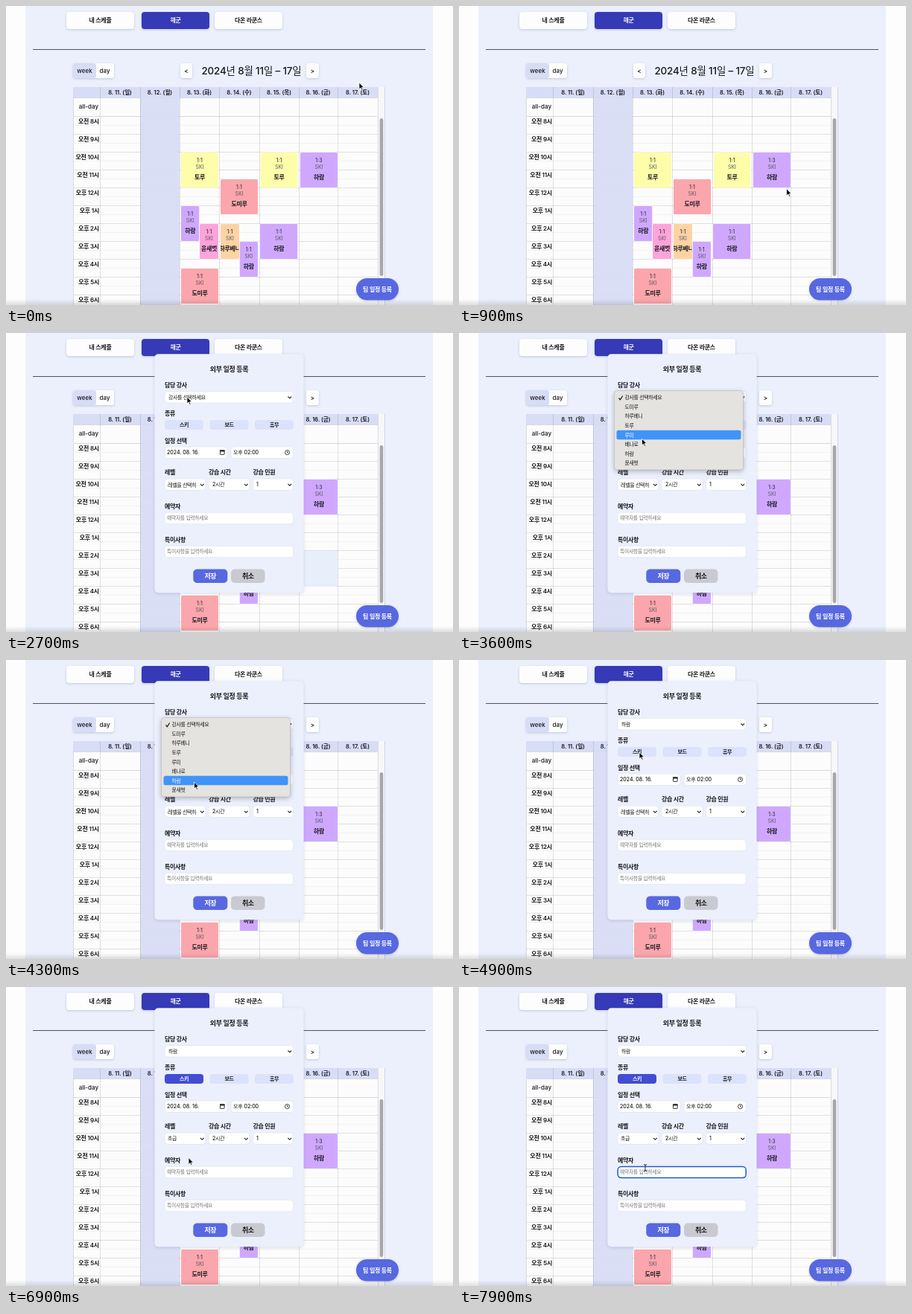
Animation, 600 px wide and 402 px high, one loop 8 s. Source, as an HTML page:

```html
<!DOCTYPE html>
<html lang="ko">
<head>
<meta charset="utf-8">
<title>팀 일정</title>
<style>
html, body { margin: 0; width: 100%; height: 100%; overflow: hidden; background: #fdfdfd; }
svg { display: block; }
text { font-family: Inter, 'Noto Sans CJK KR', 'Noto Sans CJK', sans-serif; font-weight: 500; white-space: pre; }
.m { text-anchor: middle; }
.e { text-anchor: end; }
.b { font-weight: 600; }
.n { font-weight: 400; }
.shadow { filter: drop-shadow(0 1px 1.5px rgba(40, 50, 90, .22)); }
.soft { filter: drop-shadow(0 1px 2px rgba(40, 50, 90, .16)); }
.deep { filter: drop-shadow(0 2px 3px rgba(40, 40, 60, .3)); }
</style>
</head>
<body>
<svg id="stage" width="600" height="402"></svg>
<script>
const INK = '#17171c', PALE = '#d8ddf6', PAGE = '#ebf0fc', BLUE = '#5768e0', WHITE = '#fdfdfe';
const YELLOW = '#fdfdaa', RED = '#fba6ac', PURPLE = '#cfa8fe', PINK = '#fda4da', ORANGE = '#fed3a4';
const SHORT = '하람', DUO = '토루', TRIO = '도미루', QUAD = '하루베니', FULL = '윤새벗';

const rect = (x, y, w, h, fill, r = 0, more = '') =>
  `<rect x="${x}" y="${y}" width="${w}" height="${h}" rx="${r}" fill="${fill}" ${more}/>`;

// y is the middle of the line; Hangul is set a little tighter than Latin
const text = (x, y, s, size = 8, cls = '', fill = INK) => {
  const tight = -.05 * (s.match(/[가-힣]/g) || []).length / s.length;
  return `<text x="${x}" y="${y + size * .36}" font-size="${size}" class="${cls}" fill="${fill}" letter-spacing="${(tight * size).toFixed(3)}">${s}</text>`;
};
const path = (d, stroke, w = 1, more = '') =>
  `<path d="${d}" fill="none" stroke="${stroke}" stroke-width="${w}" ${more}/>`;
const button = (x, y, w, h, s, fill, ink, size = 8, r = 4, cls = 'shadow') =>
  rect(x, y, w, h, fill, r, `class="${cls}"`) + text(x + w / 2, y + h / 2, s, size, 'm b', ink);
const box = (x, y, w, h, inner) => `<svg x="${x}" y="${y}" width="${w}" height="${h}">${inner}</svg>`;
const group = (id, inner, more = '') => `<g id="${id}" ${more}>${inner}</g>`;

function event(x, y, w, name, fill, ratio = '1:1') {
  return rect(x - .5, y - .5, w + 1, 48, '#fff', 2) + box(x, y, w, 47,
    rect(0, 0, w, 47, fill, 1.5) +
    text(w / 2, 11, ratio, 6.9, 'm', '#3c3942') +
    text(w / 2, 20, 'SKI', 6.9, 'm n', '#5d5965') +
    text(w / 2, 33, name, 8, 'm b'));
}

function calendar() {
  const cols = [126, 180, 233, 286, 340, 393, 445, 499];
  let out = rect(90, 109, 418, 293, '#fcfcfd');
  for (let y = 149; y < 402; y += 12)
    out += path(`M90 ${y - .5}H499`, (y - 149) % 24 ? 'rgba(0,0,0,.04)' : 'rgba(0,0,0,.11)');
  out += path('M90 123.5H508M90 148.5H508', '#d9d9de') + path('M90.5 402V109.5H508', '#d9d9e0');
  out += rect(180, 109, 53, 293, PALE, 0, 'opacity=".93"') + rect(90, 109, 409, 14, PALE) +
    rect(499, 109, 9, 293, '#f7f7f9');
  out += path([...cols, 508].map(x => `M${x + .5} 109V402`).join(''), 'rgba(0,0,0,.11)');
  [...'일월화수목금토'].forEach((day, i) =>
    out += text((cols[i] + cols[i + 1]) / 2, 115.8, `8. ${11 + i}. (${day})`, 7.6, 'm b'));
  out += text(124, 135, 'all-day', 8, 'e');
  for (let h = 8; h < 19; h++)
    out += text(125, 155.3 + (h - 8) * 24, `${h < 12 ? '오전' : '오후'} ${h > 12 ? h - 12 : h}시`, 8, 'e b');
  out += group('cell', rect(394, 293, 51, 48, '#e8effb'));
  out += event(235, 197, 50, DUO, YELLOW) + event(288, 233, 50, TRIO, RED) +
    event(341.5, 197, 50, DUO, YELLOW) + event(395, 197, 50, SHORT, PURPLE, '1:3') +
    event(235, 269, 24.5, SHORT, PURPLE) + event(260, 293, 25, FULL, PINK) +
    event(288, 293, 25, QUAD, ORANGE) + event(313.5, 317, 24.5, SHORT, PURPLE) +
    event(341, 293, 50.5, SHORT, PURPLE) + event(235, 353, 50, TRIO, RED);
  return out + rect(501.7, 151, 4.6, 212, '#a8a8ac', 2.3);
}

const field = (x, y, w) => rect(x, y, w, 15.5, '#fff', 4, 'stroke="#dfe3ee" stroke-width=".7"');
const select = (x, y, w, inner) => field(x, y, w) + inner +
  path(`M${x + w - 7} ${y + 7}l2.3 2.3l2.3-2.3`, '#222', 1.1);

function modal() {
  let out = rect(199.4, 28.3, 200.2, 321, '#ecf0fc', 5, 'class="soft"') + text(299.5, 48.3, '외부 일정 등록', 9, 'm b');
  [[213, 70.3, '담당 강사'], [213, 108, '종류'], [213, 145, '일정 선택'], [213, 187.5, '레벨'],
   [272, 187.5, '강습 시간'], [331.5, 187.5, '강습 인원'], [213, 233, '예약자'], [213, 278, '특이사항']]
    .forEach(([x, y, s]) => out += text(x, y, s, 8, 'b'));
  out += select(213, 78.5, 172.5, group('noTeacher', text(218, 86.3, '강사를 선택하세요', 6.9)) +
    group('teacher', text(218, 86.3, SHORT, 6.9)));
  ['스키', '보드', '휴무'].forEach((s, i) =>
    out += button(213 + i * 60.5, 117, 52, 13, s, '#dbe2fb', INK, 7, 4, ''));
  out += group('ski', button(213, 117, 52, 13, '스키', '#414dd2', '#fff', 7, 4, ''));
  out += field(213, 153, 84) + text(216, 160.8, '2024. 08. 16.', 7) +
    rect(287.5, 158.2, 5.6, 5.2, 'none', .5, 'stroke="#222" stroke-width=".9"') + rect(287, 157.3, 6.6, 2.2, '#222') +
    field(302, 153, 83.5) + text(305, 160.8, '오후 02:00', 7) +
    '<circle cx="377.5" cy="160.6" r="3" fill="none" stroke="#222" stroke-width=".9"/>' +
    path('M377.5 158.7V160.8H379', '#222', .8);
  out += select(213, 196, 55, group('noLevel', box(217, 196, 38.2, 16, text(0, 8, '레벨을 선택하세요', 7))) +
    group('level', text(217, 204, '초급', 6.9)));
  out += select(272, 196, 55, text(277, 204, '2시간', 6.9)) + select(331.5, 196, 54, text(336, 204, '1', 6.9));
  out += field(213, 241.3, 172.5) + field(213, 286.3, 172.5) +
    text(216, 249, '예약자를 입력하세요', 6.8, 'n', '#77777e') +
    text(216, 294, '특이사항을 입력하세요', 6.8, 'n', '#77777e');
  out += group('focus', rect(213.2, 241.5, 172, 15, 'none', 4.5, 'stroke="#1d5fc4" stroke-width="1.5"'));
  return out + button(251.3, 317.6, 46, 18.4, '저장', BLUE, '#fff', 9, 5, '') +
    button(302, 317.6, 45.5, 18.4, '취소', '#c9cad1', INK, 9, 5, '');
}

const STEP = 12.55, TOP = { teachers: 80.5, levels: 198 };
const menu = (id, x, w, items) => group(id,
  rect(x, TOP[id] - 3, w, items.length * STEP + 6, '#e5e3df', 4, 'class="deep" stroke="#b9b6b8" stroke-width=".6"') +
  rect(x + 3, TOP[id], w - 6, STEP, '#4094f9', 2.5, 'class="mark"') +
  items.map((s, i) => text(x + 14, TOP[id] + 6.4 + i * STEP, s, 6.9, 'item')).join('') +
  path(`M${x + 6} ${TOP[id] + 7}l1.8 2.2l3.4-5.2`, INK, 1.2, 'class="check"'));

const stage = document.getElementById('stage');
stage.innerHTML =
  `<linearGradient id="fade" x2="0" y2="1"><stop stop-opacity="0"/><stop offset="1" stop-opacity=".12"/></linearGradient>` +
  rect(0, 0, 600, 402, '#fdfdfd') + rect(26, 0, 547, 402, PAGE) +
  button(81, 8, 91, 23, '내 스케줄', WHITE, INK) + button(182, 8, 91, 23, '해군', '#363ab7', '#fff') +
  button(280, 8, 91, 23, '다온 라쿤스', WHITE, INK) +
  path('M36 58.5H563', '#50515f') +
  rect(90, 77, 55, 20, WHITE, 3, 'class="shadow"') + rect(90, 77, 31, 20, PALE, 3) +
  text(105.5, 87, 'week', 8, 'm') + text(132.5, 87, 'day', 8, 'm') +
  button(234, 77, 16, 20, '&lt;', WHITE, INK, 8, 3) + button(403, 77, 17, 20, '&gt;', WHITE, INK, 8, 3) +
  text(329.5, 87, '2024년 8월 11일 – 17일', 13.4, 'm') +
  calendar() +
  button(470, 366, 57, 29.5, '팀 일정 등록', BLUE, '#fff', 8, 14.7, 'shadow') +
  rect(0, 394, 600, 8, 'url(#fade)') +
  group('modal', modal()) +
  menu('teachers', 208.5, 173, ['강사를 선택하세요', TRIO, QUAD, DUO, '루미', '베나로', SHORT, FULL]) +
  menu('levels', 208.5, 72, ['레벨을 선택하세요', '초급', '중급', '고급']) +
  group('arrow', '<path d="M0 0V9L2.1 7.1L3.6 10.4L5 9.8L3.6 6.6H6.4Z" fill="#000" stroke="#fff" stroke-width=".8"/>') +
  group('beam', path('M-2-4.5Q0-4.5 0-3Q0-4.5 2-4.5M0-3.5V3.5M-2 4.5Q0 4.5 0 3Q0 4.5 2 4.5', '#222', .9));

const $ = id => document.getElementById(id);
const show = (id, on) => $(id).style.display = on ? '' : 'none';

// time, x, y of the pointer
const track = [[0, 474, 103], [200, 474, 103], [1400, 419, 332], [1900, 419, 332], [2600, 243, 86], [2900, 243, 86],
  [3600, 245.5, 142], [4300, 252.5, 164], [4500, 252.5, 164], [4900, 242, 124], [5100, 242, 124], [5400, 252, 204],
  [5900, 252, 204], [6300, 240, 216], [6600, 240, 216], [7200, 250, 243], [8000, 250, 243]];

function pointer(t) {
  const i = track.findIndex(k => k[0] > t), [t0, x0, y0] = track[i - 1], [t1, x1, y1] = track[i];
  const u = (t - t0) / (t1 - t0), e = u * u * (3 - 2 * u);
  return [x0 + (x1 - x0) * e, y0 + (y1 - y0) * e];
}

function mark(id, y) {
  const items = [...$(id).querySelectorAll('.item')], bar = $(id).querySelector('.mark');
  const at = Math.max(0, Math.min(items.length - 1, Math.floor((y - TOP[id]) / STEP)));
  bar.setAttribute('y', TOP[id] + at * STEP);
  items.forEach((el, i) => el.setAttribute('fill', i === at ? '#fff' : INK));
  $(id).querySelector('.check').setAttribute('stroke', at ? INK : '#fff');
}

function draw(now) {
  const t = Math.floor(now % 8000 / 100) * 100, [x, y] = pointer(t);
  show('cell', t >= 1600 && t < 2900);
  show('modal', t >= 2000);
  show('teachers', t >= 2900 && t < 4500);
  show('noTeacher', t < 4500);
  show('teacher', t >= 4500);
  show('ski', t >= 5000);
  show('levels', t >= 5600 && t < 6500);
  show('noLevel', t < 6500);
  show('level', t >= 6500);
  show('focus', t >= 7400);
  mark('teachers', y);
  mark('levels', y);
  const typing = t > 6600 && y > 241;
  show('arrow', !typing);
  show('beam', typing);
  for (const id of ['arrow', 'beam']) $(id).setAttribute('transform', `translate(${x} ${y})`);
}

const start = performance.now();
(function tick() {
  draw(performance.now() - start);
  requestAnimationFrame(tick);
})();
</script>
</body>
</html>
```
